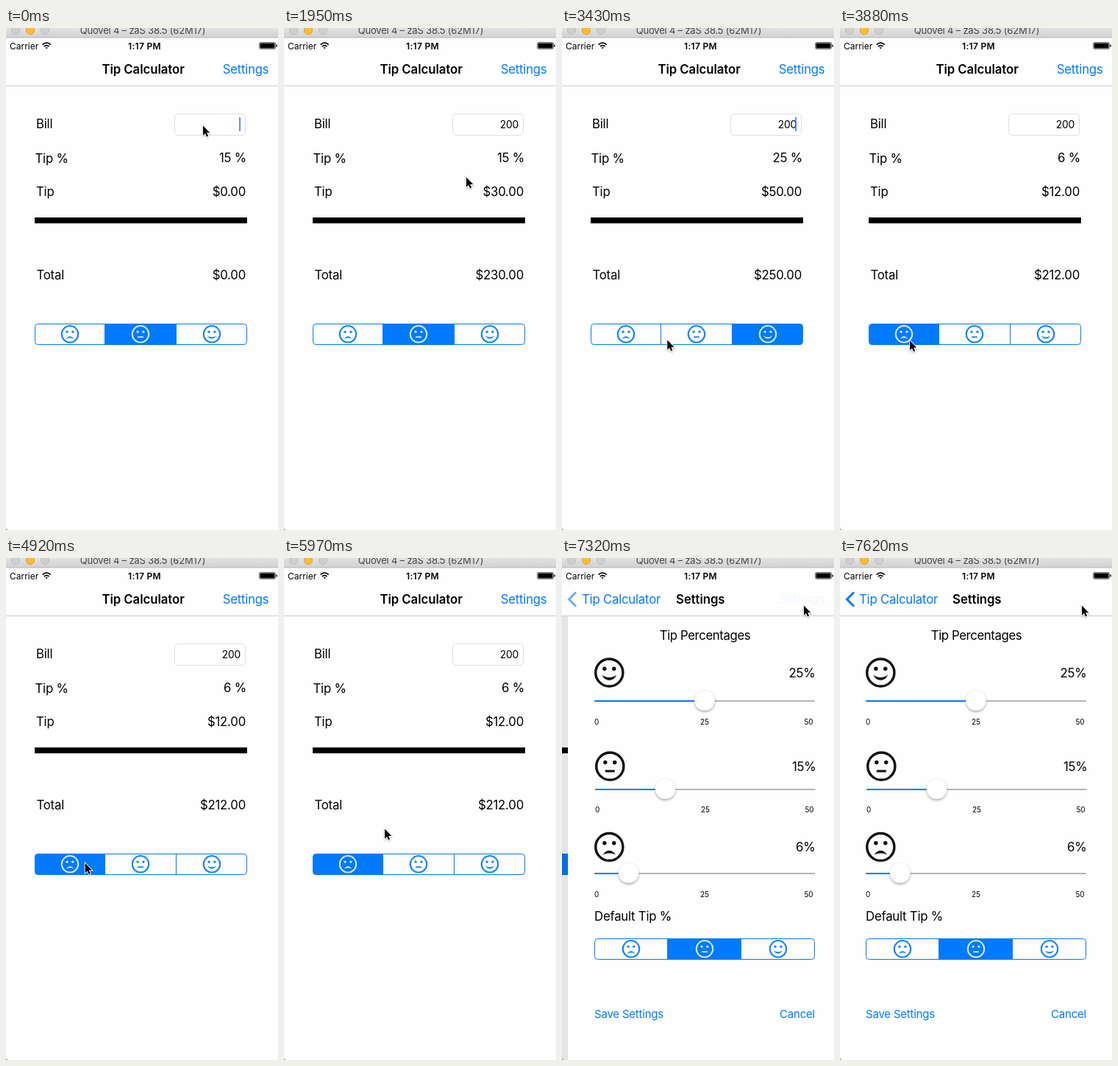
These frames come from a looping animation (370x681 px, 8 s). An HTML page:

```html
<!DOCTYPE html>
<html lang="en">
<head>
<meta charset="utf-8">
<title>Tip Calculator</title>
<style>
  html, body { margin: 0; width: 100%; height: 100%; overflow: hidden; background: #fefefe; }
  svg { display: block; width: 370px; height: 681px; }
  text { font: 16.8px Inter, "Open Sans", sans-serif; letter-spacing: -.014em; fill: #000; }
  .bold { font-weight: 600; letter-spacing: -.004em; }
  .end { text-anchor: end; }
  .mid { text-anchor: middle; }
  .link { fill: #007aff; }
  .heading { letter-spacing: -.024em; }
  .action { font-size: 15px; }
  .field { font-size: 13.8px; }
  .tick { font-size: 10px; }
  .status { font-size: 12px; letter-spacing: 0; }
  .clock { letter-spacing: .3px; }
  .window { font-size: 13px; letter-spacing: -.2px; fill: #454545; }
</style>
</head>
<body>
<svg viewBox="0 0 370 681">
  <defs>
    <linearGradient id="chrome" x2="0" y2="1">
      <stop stop-color="#e3e2e3"/><stop offset="1" stop-color="#d2d1d2"/>
    </linearGradient>
    <filter id="soft" x="-50%" y="-50%" width="200%" height="200%">
      <feDropShadow dx="0" dy="2" stdDeviation="1.6" flood-opacity=".3"/>
    </filter>
    <filter id="cast" x="-50%" y="-50%" width="200%" height="200%">
      <feDropShadow dx="0" dy="1" stdDeviation="1" flood-opacity=".35"/>
    </filter>
    <g id="head">
      <circle r="9.2" fill="none" stroke="currentColor" stroke-width="1.7"/>
      <circle cx="-3.2" cy="-2.6" r="1.35" fill="currentColor"/>
      <circle cx="3.2" cy="-2.6" r="1.35" fill="currentColor"/>
    </g>
    <g id="face0"><use href="#head"/><path fill="currentColor" d="M-4.1 5.4C-2.8 1.5 2.8 1.5 4.1 5.4 2.4 3.8-2.4 3.8-4.1 5.4Z"/></g>
    <g id="face1"><use href="#head"/><path fill="currentColor" d="M-3.2 2.5H3.2V4H-3.2Z"/></g>
    <g id="face2"><use href="#head"/><path fill="currentColor" d="M-4.8 1.5C-3.2 6.3 3.2 6.3 4.8 1.5 2.6 3.8-2.6 3.8-4.8 1.5Z"/></g>
  </defs>

  <rect width="370" height="681" fill="#fefefe"/>

  <g id="home">
    <text x="41" y="136">Bill</text>
    <text x="39.5" y="183">Tip %</text>
    <text x="41" y="228">Tip</text>
    <text x="41.5" y="341">Total</text>
    <rect x="229.5" y="116.5" width="96" height="29" rx="4.5" fill="#fff" stroke="#dedede"/>
    <text id="bill" class="field end" x="319" y="136"></text>
    <rect id="caret" x="317.2" y="121" width="1.8" height="19" fill="#5580f0"/>
    <text id="percent" class="end" x="327" y="182"></text>
    <text id="tip" class="end" x="326" y="228"></text>
    <text id="total" class="end" x="326" y="341"></text>
    <rect x="39" y="257" width="289" height="8"/>
    <g id="rating"></g>
  </g>
  <rect id="dim" y="79" width="370" height="602" opacity=".1"/>

  <g id="prefs">
    <rect x="-1" y="79" width="372" height="602" fill="#fefefe"/>
    <text class="heading mid" x="185.5" y="111">Tip Percentages</text>
    <g id="sliders"></g>
    <text x="35" y="491.5">Default Tip %</text>
    <g id="preset"></g>
    <text class="link action" x="35" y="623.5">Save Settings</text>
    <text class="link action end" x="335" y="623.5">Cancel</text>
  </g>

  <rect y="13" width="370" height="65" fill="#fefefe"/>
  <rect y="78" width="370" height="1" fill="#cfcfcf"/>
  <text id="homeTitle" class="bold mid" x="186.6" y="62">Tip Calculator</text>
  <text id="open" class="link end" x="357.5" y="62">Settings</text>
  <g id="prefsNav">
    <path id="chevron" d="M19 46.5 9.5 56 19 65.5" fill="none" stroke="#007aff" stroke-width="3"/>
    <text id="back" class="link" x="26" y="62">Tip Calculator</text>
    <text id="prefsTitle" class="bold mid" x="186.3" y="62">Settings</text>
  </g>

  <text class="status" x="5" y="28.5">Carrier</text>
  <g fill="none" stroke="#000" stroke-width="1.8">
    <path d="M49.6 22.6Q55.2 17.7 60.8 22.6M51.8 25Q55.2 22.2 58.6 25"/>
    <path d="M53.4 26.2H57L55.2 28.4Z" fill="#000" stroke="none"/>
  </g>
  <text class="status clock bold mid" x="188.5" y="28.5">1:17 PM</text>
  <rect x="344.5" y="19.5" width="22" height="9" rx="1.8" fill="none" stroke="#000" stroke-opacity=".55"/>
  <rect x="345.5" y="20.5" width="20" height="7" rx=".8"/>
  <rect x="367.4" y="22.4" width="1.4" height="3.4" rx=".7"/>

  <rect width="370" height="13" fill="url(#chrome)"/>
  <rect y="12.5" width="370" height="1" fill="#b9b8b9"/>
  <g fill="#d0cfd0" stroke="#bdbcbd">
    <circle cx="13" cy="3" r="5.6"/>
    <circle cx="33" cy="3" r="5.6" fill="#fdbd2f" stroke="#dfa023"/>
    <circle cx="53" cy="3" r="5.6"/>
  </g>
  <text class="window mid" x="186" y="8">Quovel 4 – zaS 38.5 (62M17)</text>
  <path d="M0 677Q0 681 4 681H0Z" fill="#999"/>

  <path id="cursor" d="M0 0V13.2L3 10.4 5 14.9 7.1 14 5.2 9.6H9.3Z" stroke="#fff" stroke-width="1.8" paint-order="stroke" filter="url(#cast)"/>
</svg>
<script>
const $ = id => document.getElementById(id);
const BLUE = '#007aff';
const LOOP = 8000;

const face = (mood, x, y, scale, color) =>
  `<use href="#face${mood}" transform="translate(${x} ${y}) scale(${scale})" color="${color}"/>`;

function segments(id, x, y, width, selected, pressed = -1) {
  const pitch = (width + 1) / 3;
  const start = i => Math.floor(x + i * pitch - 1);
  const frame = `x="${x + .5}" y="${y + .5}" width="${width - 1}" height="28" rx="4"`;
  let cells = '', lines = '', faces = '';
  for (let i = 0; i < 3; i++) {
    const on = i === selected, down = i === pressed;
    const left = start(i), size = start(i + 1) + 1 - left;
    if (on || down) {
      cells += `<rect x="${left}" y="${y}" width="${size}" height="29" fill="${on ? BLUE : '#d5e6fd'}"/>`;
    }
    if (i) lines += `<rect x="${left}" y="${y}" width="1" height="29" fill="${BLUE}"/>`;
    faces += face(i, Math.round(left + size / 2), y + 14.3, 1.22, on ? '#d6e8ff' : down ? '#409cff' : '#1282ff');
  }
  $(id).innerHTML = `<clipPath id="${id}Clip"><rect ${frame}/></clipPath>
    <g clip-path="url(#${id}Clip)">${cells}${lines}</g>
    <rect ${frame} fill="none" stroke="${BLUE}"/>${faces}`;
}

function slider(mood, percent, x, y, faceY, labelY) {
  const thumb = x + 14 + percent / 50 * 272;
  return face(mood, x + 20.3, faceY, 2.02, '#111') +
    `<text class="end" x="${x + 300.5}" y="${faceY + 6}">${percent}%</text>
    <rect x="${x}" y="${y}" width="300" height="2" rx="1" fill="#b6b6b6"/>
    <rect x="${x}" y="${y}" width="${thumb - x}" height="2" rx="1" fill="${BLUE}"/>
    <circle cx="${thumb}" cy="${y}" r="14" fill="#fff" stroke="#000" stroke-opacity=".1" stroke-width=".6" filter="url(#soft)"/>
    <text class="tick" x="${x}" y="${labelY}">0</text>
    <text class="tick mid" x="${x + 150}" y="${labelY}">25</text>
    <text class="tick end" x="${x + 297.5}" y="${labelY}">50</text>`;
}

$('sliders').innerHTML =
  slider(2, 25, 35, 193, 155.5, 226) +
  slider(1, 15, 36, 313, 282.5, 345) +
  slider(0, 6, 35, 427, 392, 460);
segments('preset', 35, 516, 300, 1);

// Pointer route: tick, x, y
const route = [
  [0, 268, 132.5], [10, 268, 132.5], [13, 248, 202.5], [16, 274, 374], [18, 288, 421],
  [20, 288, 421], [24, 95, 424], [29, 95, 424], [35, 114, 409], [36, 114, 409],
  [40, 137, 367.5], [43, 330, 88], [45, 329, 64.5], [60, 329, 64.5]
];

function pointer(k) {
  const i = route.findIndex(p => p[0] > k);
  const [k0, x0, y0] = route[i - 1], [k1, x1, y1] = route[i];
  const f = (k - k0) / (k1 - k0);
  return `translate(${x0 + (x1 - x0) * f} ${y0 + (y1 - y0) * f})`;
}

function tickAt(t) {
  const drift = 10 * Math.max(0, Math.min(3, Math.floor((t - 1400) / 1000)));
  return Math.floor((t + drift) / 150);
}

const show = (id, on) => $(id).setAttribute('display', on ? 'inline' : 'none');
const shift = (id, x) => $(id).setAttribute('transform', `translate(${x} 0)`);
const money = v => '$' + v.toFixed(2);

function draw(k) {
  const typed = '200'.slice(0, Math.max(0, k - 4));
  const bill = Number(typed);
  const percent = k < 19 ? 15 : k < 25 ? 25 : 6;
  const tip = bill * percent / 100;
  $('bill').textContent = typed;
  $('percent').textContent = percent + ' %';
  $('tip').textContent = money(tip);
  $('total').textContent = money(bill + tip);
  show('caret', k < 1 || (k >= 4 && k < 11) || (k >= 14 && k % 7 < 4));

  const selected = k < 20 ? 1 : k < 26 ? 2 : 0;
  const pressed = k === 19 ? 2 : k === 25 ? 0 : -1;
  segments('rating', 39, 401, 289, selected, pressed);

  const pushed = k >= 49;
  const rest = k === 49 ? 1 : k === 50 ? .1 : 0;
  for (const id of ['prefs', 'prefsNav', 'dim']) show(id, pushed);
  show('homeTitle', !pushed);
  shift('home', pushed ? -108 : 0);
  shift('prefs', 9 * rest);
  shift('back', rest);
  shift('prefsTitle', 2 * rest);
  $('chevron').setAttribute('opacity', 1 - .4 * rest);
  $('open').setAttribute('opacity', pushed ? .05 * rest : k >= 47 ? .2 : 1);
  $('cursor').setAttribute('transform', pointer(k));
}

let last = -1;
function loop() {
  const k = tickAt(performance.now() % LOOP);
  if (k !== last) draw(last = k);
  requestAnimationFrame(loop);
}
loop();
</script>
</body>
</html>
```
